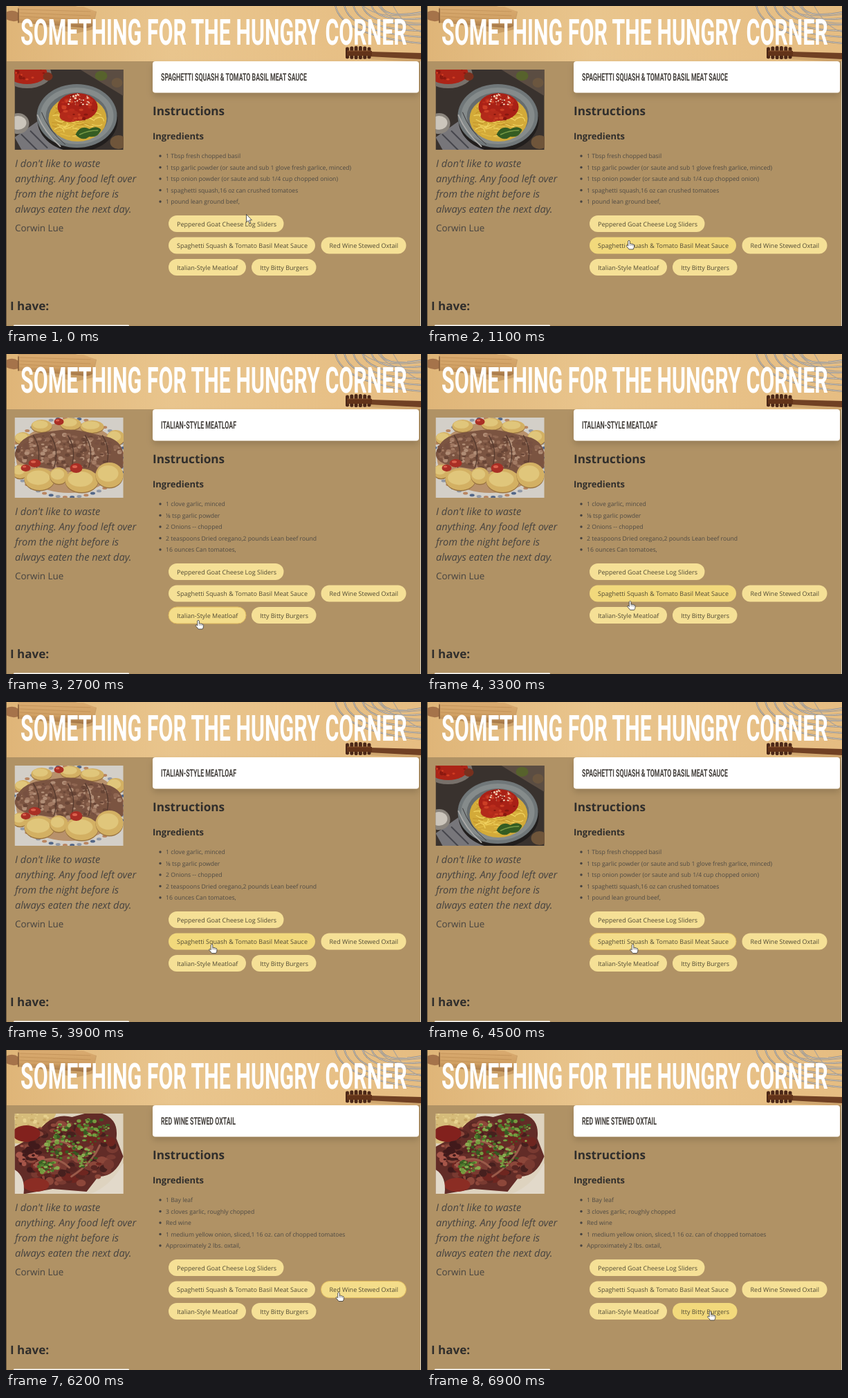
An HTML page for the animation above (7 s loop, 600x463 px).

```html
<!DOCTYPE html>
<html lang="en">
<head>
<meta charset="utf-8">
<title>Recipe finder</title>
<style>
  html, body { margin: 0; width: 100%; height: 100%; overflow: hidden; background: #b09265; }
  svg { display: block; width: 100%; height: 100%; }
  text { font-family: "Open Sans", "Noto Sans", sans-serif; fill: #464340; text-rendering: geometricPrecision; }
  .condensed { font-family: Roboto, "Liberation Sans", sans-serif; font-weight: 700; }
  .head { font-weight: 700; fill: #302e2c; }
  .quote { font-size: 14.6px; font-style: italic; }
  .item { font-size: 8.67px; fill: #4e4a44; }
  .label { font-size: 9.02px; fill: #514a34; }
</style>
</head>
<body>
<svg id="stage" viewBox="0 0 600 463" preserveAspectRatio="none"></svg>
<script>
let seed = 7;
const rand = () => (seed = seed * 16807 % 2147483647) / 2147483647;
const pick = list => list[Math.floor(rand() * list.length)];
const repeat = (n, make) => Array.from({ length: n }, (_, i) => make(i)).join('');
const safe = s => s.replace(/&/g, '&amp;');

const rect = (x, y, w, h, fill, extra = '') =>
  `<rect x="${x}" y="${y}" width="${w}" height="${h}" fill="${fill}" ${extra}/>`;
const oval = (x, y, rx, ry, fill, extra = '') =>
  `<ellipse cx="${x}" cy="${y}" rx="${rx}" ry="${ry}" fill="${fill}" ${extra}/>`;
const shape = (d, fill, extra = '') => `<path d="${d}" fill="${fill}" ${extra}/>`;
const line = (d, color, width = 1) => shape(d, 'none', `stroke="${color}" stroke-width="${width}" stroke-linecap="round"`);
const text = (x, y, s, cls, size) =>
  `<text x="${x}" y="${y}" class="${cls}" ${size ? `font-size="${size}"` : ''}>${safe(s)}</text>`;
const condensed = (x, y, s, size, fill) =>
  `<text transform="translate(${x} ${y}) scale(.585 1)" class="condensed" font-size="${size}" style="fill:${fill}">${safe(s)}</text>`;

// Scatter small dabs inside an ellipse
const dabs = (n, x, y, rx, ry, colors, size) => repeat(n, () => {
  const a = rand() * 6.283, d = Math.sqrt(rand()), s = size * (.5 + rand());
  return oval(x + rx * d * Math.cos(a), y + ry * d * Math.sin(a), s, s * (.5 + rand() * .5), pick(colors));
});
const strands = (n, x, y, rx, ry, colors) => repeat(n, () => {
  const a = rand() * 6.283, d = Math.sqrt(rand()) * .85;
  const px = x + rx * d * Math.cos(a), py = y + ry * d * Math.sin(a);
  return line(`M${px - 7} ${py}q${rand() * 14} ${rand() * 16 - 8} 14 ${rand() * 8 - 4}`, pick(colors), 1.2);
});

function spaghetti() {
  return rect(0, 0, 157, 116, '#39322e') +
    shape('M95 0h62v38q-30-18-62-38z', '#5b4d42') +
    shape('M0 98L40 70 75 116H10z', '#77767a') +
    repeat(4, i => line(`M${10 + i * 13} ${94 - i * 5}l24 24`, '#45454b', 2)) +
    oval(18, 6, 35, 21, '#77706a') + oval(18, 5, 29, 16, '#ac2417') +
    dabs(18, 18, 5, 25, 12, ['#d23c22', '#8c1910'], 2.5) +
    oval(5, 78, 16, 15, '#8b857d') + oval(5, 77, 12, 10, '#cbc5bb') +
    oval(48, 10, 7, 6, '#77301e') + oval(125, 9, 9, 7, '#57622c') + oval(148, 19, 8, 7, '#6b563f') +
    oval(91, 73, 58, 46, '#211e1d') + oval(90, 67, 58, 46, '#707779') +
    oval(90, 67, 53, 41, '#858b8b') + oval(90, 68, 45, 35, '#666c6e') +
    oval(91, 71, 42, 33, '#d3aa39') + strands(75, 91, 72, 40, 31, ['#f1d360', '#c4942b', '#e4bd45']) +
    oval(91, 54, 29, 20, '#a92116') + oval(80, 67, 15, 9, '#b32a1a') +
    dabs(35, 91, 56, 25, 18, ['#cc3f25', '#871810', '#bb2c1c'], 3) +
    dabs(25, 92, 45, 19, 10, ['#f2ddc0', '#eecab0'], 1.2) +
    shape('M88 94q7-15 20-8 10-6 17 1-4 12-17 10-10 8-20-3z', '#345c22') +
    line('M94 94q12-6 26-6', '#7b9c47', 1.5) +
    line('M33 66Q43 91 66 111', '#aaa9a7', 2) + line('M39 62Q49 89 73 108', '#3b3a3c', 1) +
    oval(150, 105, 12, 10, '#6f553a');
}

function meatloaf() {
  const potato = (x, y, rx, ry) => oval(x, y + 1.5, rx, ry, '#9a7440') + oval(x, y, rx, ry, '#d3b063') +
    oval(x - 2, y - 2, rx * .75, ry * .65, '#e0c67b');
  const potatoes = list => list.map(p => potato(...p)).join('');
  return rect(0, 0, 157, 116, '#d3cfc8') +
    repeat(50, i => {
      const a = i / 50 * 6.283;
      return oval(78 + 82 * Math.cos(a), 58 + 57 * Math.sin(a), 3.5, 2, ['#536788', '#b98560', '#8f97a5'][i % 3]);
    }) + oval(78, 58, 76, 51, '#b8916b') +
    potatoes([[12, 30, 12, 9], [39, 12, 15, 9], [81, 9, 15, 9], [112, 13, 17, 9], [146, 29, 13, 11]]) +
    shape('M0 52Q7 26 38 22L66 18Q88 16 108 22L138 29Q155 36 157 52V72Q145 83 111 80L68 77 26 70Q0 66 0 52z', '#7b5441') +
    dabs(230, 78, 49, 75, 26, ['#8f6651', '#684536', '#a27a63', '#775040', '#b08d76'], 2.6) +
    repeat(5, i => line(`M${27 + i * 25} 26q13 20 5 46`, '#563a2e', 1.4)) +
    potatoes([[8, 78, 12, 10], [36, 89, 22, 16], [64, 84, 13, 12], [97, 91, 24, 17], [137, 83, 20, 18]]) +
    [[29, 66, 9, 6], [16, 73, 7, 5], [89, 73, 9, 7], [64, 6, 7, 5]].map(([x, y, rx, ry]) =>
      oval(x, y, rx, ry, '#a92f25') + oval(x - 2, y - 2, rx * .4, ry * .3, '#dc614d')).join('');
}

function oxtail() {
  return rect(0, 0, 157, 116, '#ded3bf') + shape('M0 0H60Q40 47 0 43z', '#d6bc7a') +
    dabs(70, 20, 20, 35, 25, ['#e8d28f', '#c6a764'], 2) +
    shape('M0 48L31 31Q52-3 83 5L112-3Q152 1 147 36L157 62Q145 92 121 91L104 113 55 109 15 116H0z', '#622c27') +
    dabs(160, 78, 56, 66, 47, ['#793a31', '#46201e', '#8d473a', '#592622', '#6e2620'], 6) +
    oval(17, 29, 20, 12, '#82211d') + oval(31, 103, 19, 10, '#8b2d24') +
    dabs(30, 25, 62, 22, 21, ['#a65649', '#411a1b'], 4) +
    line('M31 72Q58 57 79 78M82 91Q112 72 123 46M40 48Q60 31 83 48', '#9a5b4a', 3) +
    [[83, 28, 27, 20], [116, 25, 22, 20], [66, 50, 23, 18], [99, 62, 19, 15], [48, 77, 14, 10]].map(([x, y, rx, ry]) =>
      dabs(45, x, y, rx, ry, ['#4d792b', '#769b3f', '#375b22', '#8aac50'], 2.2)).join('') +
    shape('M0 81Q16 91 13 116H0zM157 72v44H110Q139 105 157 72z', '#e2d9ca');
}

const dishes = {
  spaghetti: { name: 'Spaghetti Squash & Tomato Basil Meat Sauce', photo: spaghetti, items: [
    '1 Tbsp fresh chopped basil', '1 tsp garlic powder (or saute and sub 1 glove fresh garlice, minced)',
    '1 tsp onion powder (or saute and sub 1/4 cup chopped onion)',
    '1 spaghetti squash,16 oz can crushed tomatoes', '1 pound lean ground beef,'] },
  meatloaf: { name: 'Italian-Style Meatloaf', photo: meatloaf, items: [
    '1 clove garlic, minced', '⅛ tsp garlic powder', '2 Onions -- chopped',
    '2 teaspoons Dried oregano,2 pounds Lean beef round', '16 ounces Can tomatoes,'] },
  oxtail: { name: 'Red Wine Stewed Oxtail', photo: oxtail, items: [
    '1 Bay leaf', '3 cloves garlic, roughly chopped', 'Red wine',
    '1 medium yellow onion, sliced,1 16 oz. can of chopped tomatoes', 'Approximately 2 lbs. oxtail,'] }
};
const pills = [
  [235, 303, 166.5, 'Peppered Goat Cheese Log Sliders'],
  [235, 334.5, 212, dishes.spaghetti.name, 'spaghetti'],
  [455.5, 334.5, 123, dishes.oxtail.name, 'oxtail'],
  [235, 366, 112, dishes.meatloaf.name, 'meatloaf'],
  [355, 366, 93.5, 'Itty Bitty Burgers']
];

const header = () => rect(0, 0, 600, 80, 'url(#sand)') +
  // rolling pin
  shape('M18 20L100 40 126 34 131 8 100 0H18z', '#a87a48', 'opacity=".45"') +
  shape('M17 1H112L130 8 125 29Q117 34 108 31L17 24z', 'url(#wood)') +
  repeat(4, i => line(`M20 ${5 + i * 5}L122 ${8 + i * 6}`, '#b98850', .6)) +
  shape('M0 9Q10 4 18 10V21Q9 24 0 19z', '#a5734a') + line('M18 4V24', '#7d5635', 1.4) +
  // whisk
  repeat(6, i => {
    const loop = `M${476 + i * 13} -2C${480 + i * 13} ${26 - i * 3} ${520 + i * 8} ${46 - i * 6} 601 ${54 - i * 9}`;
    return line(loop, '#8d877f', 2.2) + line(loop, '#d8d0c5', .9);
  }) +
  repeat(3, i => line(`M${515 + i * 22} -2Q${535 + i * 20} ${20 + i * 5} 601 ${12 + i * 13}`, '#aaa298', 1.2)) +
  // honey dipper
  shape('M500 76L600 81V76L530 70z', '#9c713f', 'opacity=".3"') +
  shape('M525 66L600 68V77L525 73z', '#704023') +
  repeat(6, i => rect(491 + i * 6.3, 60 - Math.sin((i + .5) / 6 * 3.14) * 2, 5, 16 + Math.sin((i + .5) / 6 * 3.14) * 3, '#4b2717', 'rx="2"')) +
  rect(493, 65, 36, 7, '#623319') + line('M494 65H526', '#8a542e', 1) +
  condensed(21, 56, 'SOMETHING FOR THE HUNGRY CORNER', 52, '#fff');

const quote = ["I don't like to waste", 'anything. Any food left over', 'from the night before is', 'always eaten the next day.'];

const recipe = ([id, d]) => `<g id="${id}">
  <g transform="translate(12.5 92)" clip-path="url(#frame)">${d.photo()}</g>` +
  condensed(224, 107.5, d.name.toUpperCase(), 15, '#45413d') +
  d.items.map((s, i) => oval(223, 217 + i * 16.5, 1.7, 1.7, '#464340') + text(231, 220 + i * 16.5, s, 'item')).join('') + '</g>';

const stage = document.getElementById('stage');
stage.innerHTML = `<defs>
    <linearGradient id="sand"><stop stop-color="#dfb578"/><stop offset=".4" stop-color="#e9c58d"/><stop offset="1" stop-color="#e6bd82"/></linearGradient>
    <linearGradient id="wood" x2="0" y2="1"><stop stop-color="#d9ab70"/><stop offset=".6" stop-color="#d0a064"/><stop offset="1" stop-color="#9c6f43"/></linearGradient>
    <clipPath id="frame"><rect width="157.5" height="116"/></clipPath>
    <filter id="shade" x="-10%" y="-30%" width="120%" height="200%"><feDropShadow dx="0" dy="5" stdDeviation="5" flood-opacity=".15"/></filter>
  </defs>` +
  rect(0, 0, 600, 463, '#b09265') + header() +
  rect(0, 0, 1, 463, '#6d5a40') + rect(599, 80, 1, 383, '#d9cdb9') +
  rect(212, 80, 385, 45.5, '#fff', 'rx="4" filter="url(#shade)"') +
  Object.entries(dishes).map(recipe).join('') +
  text(212, 158, 'Instructions', 'head', 17.2) + text(212, 193, 'Ingredients', 'head', 13) +
  text(6, 440, 'I have:', 'head', 17) +
  quote.map((s, i) => text(13, 233 + i * 22, s, 'quote')).join('') +
  text(13, 325.5, 'Corwin Lue', '', 13.4) +
  rect(11, 461.5, 167, 2, '#fff', 'rx="1"') +
  pills.map(([x, y, w, s]) => rect(x, y, w, 24, '#f5e096', 'rx="12" class="pill"') + text(x + 12, y + 15.5, s, 'label')).join('') +
  '<g id="arrow">' + shape('M0 0V11.5L2.7 9 4.5 13 6.3 12.2 4.5 8.3H8z', '#fff', 'stroke="#333" stroke-width=".8"') + '</g>' +
  '<g id="hand">' + shape('M-1.3 1Q0-.8 1.3 1V5Q2.7 3.9 3.4 5.3 5 4.4 5.6 6 7.3 5.4 7.4 7.2V9.6Q7.2 11.3 6 13H0Q-1.5 10.6-3.8 8.5-4.1 6.8-2.5 7L-1.3 8.2z', '#fff', 'stroke="#333" stroke-width=".8"') +
  line('M1.3 5V7.5M3.4 5.5V7.6M5.5 6.2V8', '#555', .6) + '</g>';

const buttons = stage.querySelectorAll('.pill');
const byId = id => document.getElementById(id);
const show = (id, on) => byId(id).setAttribute('display', on ? 'inline' : 'none');

const path = [[0, 347.5, 301.5], [900, 292, 339], [1200, 292, 339], [1900, 278, 385], [2800, 278, 385],
  [3500, 297.5, 350.5], [5300, 297.5, 350.5], [5900, 481, 350.5], [6300, 481, 350.5], [6900, 409.5, 378]];
const clicks = [[2300, 'meatloaf'], [4400, 'spaghetti'], [6000, 'oxtail']];

function pointer(t) {
  const i = Math.max(1, path.findIndex(k => k[0] >= t));
  const [a, b] = [path[i - 1], path[i]];
  const p = (t - a[0]) / (b[0] - a[0]), e = p * p * (3 - 2 * p);
  return [1, 2].map(n => a[n] + (b[n] - a[n]) * e);
}

function draw(now) {
  const t = Math.floor(now % 7000 / 100) * 100;
  const [x, y] = pointer(t);
  const clicked = clicks.filter(c => c[0] <= t).pop()?.[1];
  const current = clicked || 'spaghetti';
  Object.keys(dishes).forEach(id => show(id, id === current));
  const over = pills.findIndex(([px, py, w]) => x >= px && x <= px + w && y >= py && y <= py + 24);
  buttons.forEach((b, i) => {
    const hovered = i === over, focused = hovered && clicked && pills[i][4] === clicked;
    b.setAttribute('fill', focused ? '#f4dd8a' : hovered ? '#f2d97c' : '#f5e096');
    b.setAttribute('stroke', focused ? '#dfb95f' : 'none');
  });
  show('hand', over >= 0);
  show('arrow', over < 0);
  for (const id of ['hand', 'arrow']) byId(id).setAttribute('transform', `translate(${x} ${y})`);
  requestAnimationFrame(draw);
}
requestAnimationFrame(draw);
</script>
</body>
</html>
```
